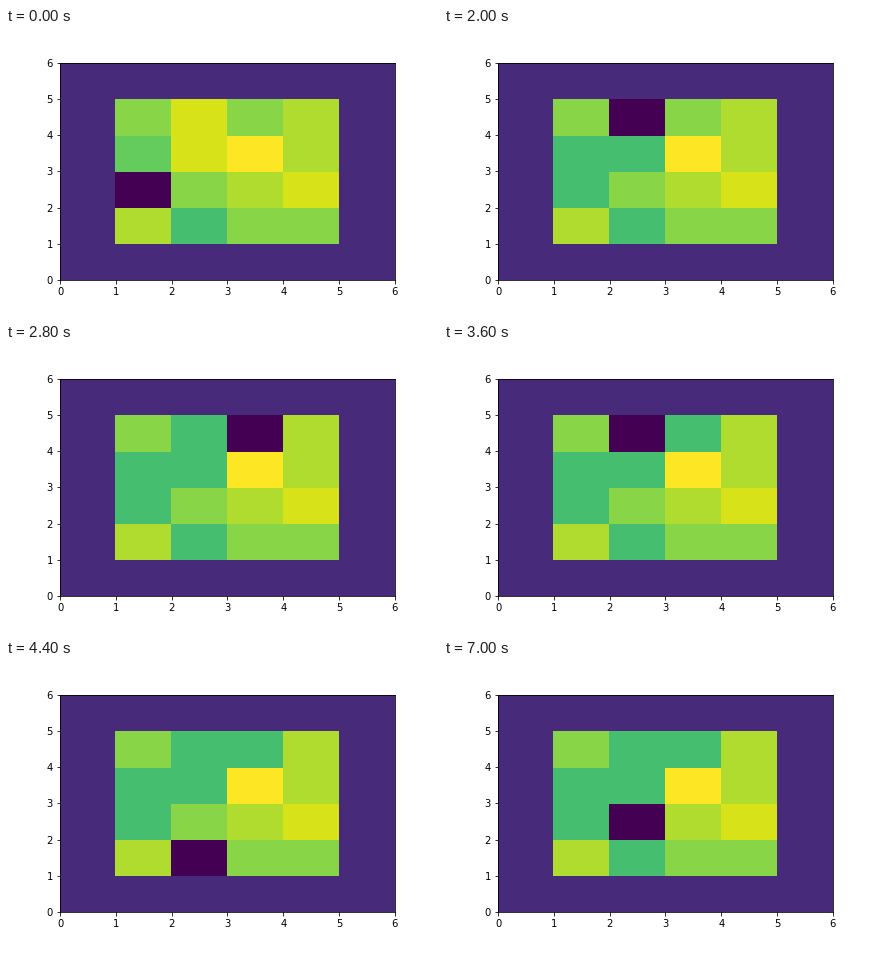
Recreate the animation shown at these times as a matplotlib script. Size 432 by 288 pixels, loop 8000 ms.

```python
import numpy as np
import matplotlib.pyplot as plt
from matplotlib.animation import FuncAnimation

TICK_MS = 200
TICKS = 40
SIZE = 6
AGENT, WALL, WORN, PEAK = 0, 2, 12, 17

# Terrain inside the wall, as height above worn ground, bottom row first.
HILLS = [[3, 0, 2, 2],
         [0, 2, 3, 4],
         [1, 4, 5, 3],
         [2, 4, 2, 3]]
TERRAIN = np.pad(WORN + np.array(HILLS), 1, constant_values=WALL)

# The agent's action on each tick: a step, or a dot to stay and dig.
ACTIONS = "....^.>...^v^.>...<.vvv.......><...^"
STEPS = {"^": (1, 0), "v": (-1, 0), ">": (0, 1), "<": (0, -1)}
START = (2, 1)


def grid_at(tick):
    """Replay the actions; any cell where the agent digs is worn down."""
    grid = TERRAIN.copy()
    row, col = START
    for action in ACTIONS[:tick + 1]:
        if action == ".":
            grid[row, col] = WORN
        else:
            up, right = STEPS[action]
            row, col = row + up, col + right
    grid[row, col] = AGENT
    return grid


def cell_sizes(start, length):
    """Whole-pixel sizes of the cells sharing a length."""
    edges = np.floor(np.linspace(start, start + length, SIZE + 1) + 1e-6)
    edges[-1] = round(start + length)
    return np.diff(edges).astype(int)


plt.rcParams["font.family"] = "DejaVu Sans"
fig = plt.figure(figsize=(6, 4), dpi=72, facecolor="white")
ax = fig.add_axes([0.125, 0.125, 0.775, 0.755], facecolor="none")
ax.set(xlim=(0, SIZE), ylim=(0, SIZE),
       xticks=range(SIZE + 1), yticks=range(SIZE + 1))

left, bottom, width, height = ax.bbox.bounds
col_widths = cell_sizes(left, width)
row_heights = cell_sizes(bottom, height)


def pixels(tick):
    return grid_at(tick).repeat(row_heights, axis=0).repeat(col_widths, axis=1)


mesh = fig.figimage(pixels(0), round(left), round(bottom), cmap="viridis",
                    vmin=AGENT, vmax=PEAK, origin="lower", zorder=-1)


def update(tick):
    mesh.set_data(pixels(tick))
    return [mesh]


anim = FuncAnimation(fig, update, frames=TICKS, interval=TICK_MS,
                     repeat=True, repeat_delay=0, blit=False)
plt.show()
```
